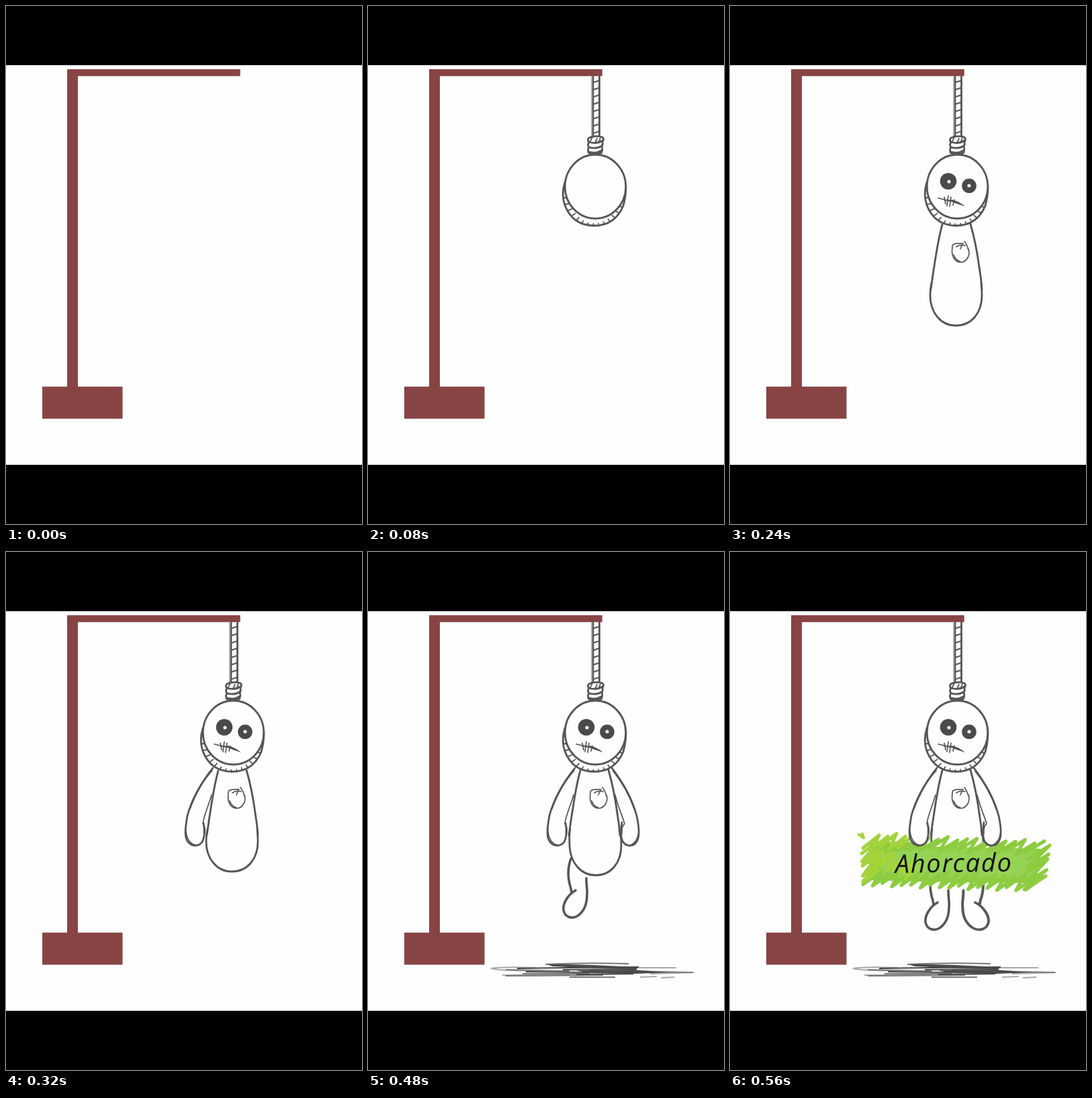
An HTML page for the animation above (0.64 s loop, 530x770 px).

```html
<!DOCTYPE html>
<html lang="es">
<head>
<meta charset="utf-8">
<title>Ahorcado</title>
<style>
html, body { margin: 0; width: 100%; height: 100%; overflow: hidden; background: #fefefe; }
svg { display: block; width: 530px; height: 770px; }
.ink { fill: none; stroke: #565653; stroke-width: 2.8; stroke-linecap: round; stroke-linejoin: round; }
.ink .paper { fill: #fefefe; }
.ink .solid { fill: #4a4a48; stroke: none; }
.ink .thin { stroke-width: 1.7; }
.ink .bold { stroke-width: 3.6; }
.wood { fill: #884445; }

/* Each part switches on at a multiple of 80 ms */
[class*="step"] { visibility: hidden; animation: 640ms step-end infinite; }
.step-rope { animation-name: rope; }
.step-face { animation-name: face; }
.step-body { animation-name: body; }
.step-left-arm { animation-name: left-arm; }
.step-right-arm { animation-name: right-arm; }
.step-leg, .step-belly-long { animation-name: leg; }
.step-end { animation-name: end; }
.step-belly-short { animation-name: belly-short; }
.step-belly-mid { animation-name: belly-mid; }
@keyframes rope { 12.5%, 100% { visibility: visible; } }
@keyframes face { 25%, 100% { visibility: visible; } }
@keyframes body { 37.5%, 100% { visibility: visible; } }
@keyframes left-arm { 50%, 100% { visibility: visible; } }
@keyframes right-arm { 62.5%, 100% { visibility: visible; } }
@keyframes leg { 75%, 100% { visibility: visible; } }
@keyframes end { 87.5%, 100% { visibility: visible; } }
@keyframes belly-short { 37.5% { visibility: visible; } 62.5%, 100% { visibility: hidden; } }
@keyframes belly-mid { 62.5% { visibility: visible; } 75%, 100% { visibility: hidden; } }
.left-leg { animation: drop 640ms step-end infinite; }
@keyframes drop { 87.5%, 100% { transform: translateY(18px); } }

.shadow { fill: none; stroke-width: 2; }
.sign { fill: none; stroke-linecap: round; stroke-linejoin: round; }
.sign text { fill: #111; font: italic 400 38px "Open Sans", "Noto Sans", sans-serif; letter-spacing: 1.8px; }
</style>
</head>
<body>
<svg viewBox="0 0 530 770">
  <defs>
    <clipPath id="collar"><ellipse cx="337" cy="277" rx="47" ry="51"/></clipPath>
    <path id="leg" d="M302 456C297 470 297 485 302 500L303 506M309 503C298 509 290 522 291 532C293 543 303 546 312 541C322 534 326 522 326 510C327 503 325 497 325 485"/>
  </defs>
  <rect width="530" height="770" fill="#fefefe"/>
  <path d="M0 0H530V88H0ZM0 682H530V770H0Z"/>
  <path class="wood" d="M91 94H348.7V104.3H107V565.8H173.5V613.5H54V565.8H91Z"/>

  <g class="step-leg">
    <g class="shadow">
      <path stroke="#aaa" d="M250 618Q200 616 183 619Q200 623 260 622M400 618H459M200 629L300 628M420 627L485 625M405 632L430 631M436 633L456 632"/>
      <path stroke="#777" d="M264 613Q320 610 388 612M205 621L300 623M330 622L484 625M230 627L330 627M205 630L350 629M300 632L368 632"/>
      <path stroke="#444" d="M222 619L300 618L403 617M290 621L400 620M235 624L340 625M310 628L395 627"/>
    </g>
    <path fill="#4a4a48" d="M266 613L300 613L335 614L402 617L400 620L350 619L300 617L275 616ZM310 622L395 621L450 625L396 627L330 626Z"/>
  </g>

  <g class="ink">
    <g class="step-leg"><use href="#leg" class="left-leg bold"/></g>
    <g class="step-end"><use href="#leg" class="bold" transform="translate(705 18) scale(-1.1 1)"/></g>

    <g class="step-body">
      <path d="M316 325C309 350 306 375 302 400M358 324C364 345 368 365 371 388"/>
      <path d="M302 400L299 421M371 388Q374 405 375 421"/>
      <path class="thin" d="M331 359C329 371 334 381 344 381C353 380 358 370 355 361M331 359C330 352 338 353 347 353M337 358Q342 354 350 356M349 350Q353 355 355 363M346 354L343 361M333 370Q336 378 343 380"/>
    </g>
    <path class="step-belly-short" d="M300 412C298 420 298 424 298 430C298 456 314 475 336 475C360 475 375 456 375 430Q375 420 374 412"/>
    <path class="step-belly-mid" d="M301 412C299 420 299 428 299.5 436C301 462 316 478.5 337 478.5C360 478.5 375 462 375 436Q375 420 374 412"/>
    <path class="step-belly-long" d="M301 412C299 420 300 428 300 436C301 462 317 480.5 339 480.5C362 480.5 377 462 377 436Q377 420 374 412"/>
  </g>

  <g class="sign step-end">
    <path fill="#8dcc40" d="M206 432L262 430L300 438L462 441L456 492L330 491L208 488Z"/>
    <path fill="#95d354" d="M222 448Q320 434 456 445L452 482Q330 490 228 482Z"/>
    <g id="scribble"></g>
    <text x="246" y="477" transform="rotate(-.8 246 477)">Ahorcado</text>
  </g>

  <g class="ink">
    <g class="step-left-arm">
      <path class="paper" d="M308 321C292 341 277 366 270 392C267 410 265 424 271 431C277 438 287 438 292 431C296 424 296 412 294 403"/>
      <path class="thin" d="M306 361C301 379 295 390 293 404Q297 407 296 418M307 325Q287 347 274 382M268 415Q270 433 283 436"/>
    </g>
    <g class="step-right-arm">
      <path class="paper" d="M363 321C380 343 393 366 400 392C404 410 405 425 399 432C393 439 383 437 379 430C376 424 376 412 378 402"/>
      <path class="thin" d="M368 361C372 379 378 390 382 404Q377 408 378 419M365 326Q385 350 397 384M403 414Q402 431 390 436"/>
    </g>

    <g class="step-rope">
      <path d="M335 105V195M344.5 105V195"/>
      <path stroke="#aaa" stroke-width="1.3" d="M332.7 105V195"/>
      <path transform="translate(340 111) skewY(-18)" stroke-width="8" stroke-linecap="butt" stroke-dasharray="2.2 8.6" d="M0 0V86"/>
      <path class="paper" d="M329 196Q338 192 349 195Q352 198 349 202Q350 206 348 209Q350 214 347 219H329Q326 214 329 210Q326 206 329 203Q326 199 329 196Z"/>
      <path d="M329 202Q340 206 349 200M329 210Q340 213 348 208M330 217Q340 220 347 215"/>
      <path class="thin" d="M334 195L331 201M341 197L338 203M346 196L344 201"/>
      <path class="paper" stroke="none" d="M290 268A47 51 0 0 0 384 268Z"/>
      <g clip-path="url(#collar)">
        <path stroke-width="24" stroke-linecap="butt" stroke-dasharray="2.2 8.3" d="M290 284A47 51 0 0 0 384 284"/>
      </g>
      <path d="M293 262C290 272 289 285 293 296C301 317 317 326.5 337 326.5C358 326.5 372 316 380 297Q384 283 384 268"/>
      <ellipse class="paper" cx="338.5" cy="268.5" rx="45.3" ry="47.5"/>
    </g>

    <g class="step-face">
      <circle class="solid" cx="325" cy="260.5" r="12.3"/>
      <circle class="solid" cx="356" cy="267.3" r="10.8"/>
      <circle cx="326" cy="261" r="2.6" fill="#eee" stroke="none"/>
      <circle cx="356" cy="267" r="2.6" fill="#eee" stroke="none"/>
      <path class="solid" d="M310 285Q322 289 331 288Q342 291 350 298Q338 294 330 291Q320 290 310 285Z"/>
      <path class="thin" d="M310 285.5Q322 289 331 290M319 284L321 294M325 282L323 297M329 284L327 298M334 288L332 296"/>
    </g>
  </g>
</svg>
<script>
const scribble = document.getElementById("scribble");
const wobble = i => Math.sin(i * 2.4) * 2.5;

function stroke(d, color, width) {
  const path = document.createElementNS("http://www.w3.org/2000/svg", "path");
  for (const [key, value] of Object.entries({ d, stroke: color, "stroke-width": width })) path.setAttribute(key, value);
  scribble.append(path);
}

// Slanted back-and-forth pen line between two points
function zigzag(x0, y0, x1, y1, count, reachX, reachY, color, width = 5) {
  let d = "";
  for (let i = 0; i <= count; i++) {
    const x = x0 + (x1 - x0) * i / count, y = y0 + (y1 - y0) * i / count + wobble(i);
    d += `${i ? "L" : "M"}${x} ${y}L${x + reachX} ${y - reachY}`;
  }
  stroke(d, color, width);
}

const green = "#8dcc40", lime = "#a3d33c";
zigzag(198, 440, 250, 440, 4, 24, 19, lime);
zigzag(268, 442, 440, 448, 12, 28, 17, green);
zigzag(198, 494, 440, 502, 17, 27, 19, green);
zigzag(196, 448, 198, 490, 4, 24, 17, lime);
zigzag(444, 456, 438, 502, 4, 32, 20, green);
stroke("M192 420L199 425L197 419", lime, 4);
zigzag(206, 462, 260, 484, 6, 22, 20, "#a9d534", 3);
</script>
</body>
</html>
```
